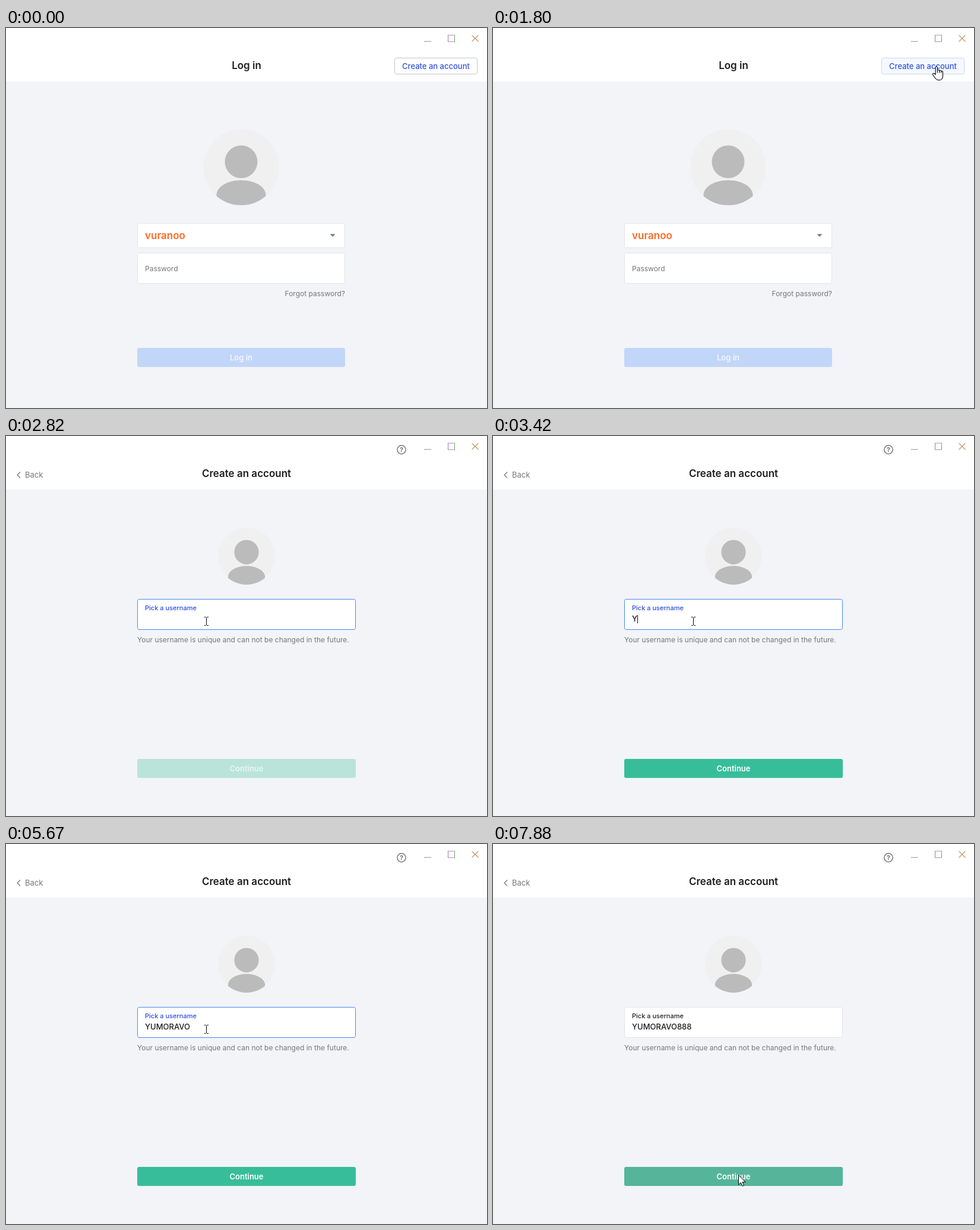
Animation, 810 px wide and 639 px high, one loop 8000 ms. Source, as an HTML page:

```html
<!DOCTYPE html>
<html lang="en">
<head>
<meta charset="utf-8">
<title>Account sign-up</title>
<style>
  html, body { margin: 0; width: 100%; height: 100%; overflow: hidden; background: #fff; }
  svg { display: block; width: 810px; height: 639px; }
  text { font: 400 12px Inter, "Open Sans", sans-serif; fill: #777; }
  .title { font-size: 17px; font-weight: 600; fill: #1c1d20; text-anchor: middle; }
  .button { font-size: 13px; font-weight: 600; fill: #fff; text-anchor: middle; }
  .field { fill: #fff; stroke: #e2e4e7; }
  .line { fill: none; stroke: #777; }
  .hide { display: none; }

  #create rect { fill: #fff; stroke: #c4c6ca; }
  #create text { font-size: 13px; font-weight: 500; fill: #3353dc; text-anchor: middle; }
  #create.hover rect { fill: #f5f9ff; stroke: #c3d8fb; }

  #label { font-size: 12px; }
  #signup.focus #label, #signup.filled #label { font-size: 11px; font-weight: 500; fill: #1f2024; }
  #signup.focus #label { fill: #2c4be0; }
  #signup.focus .field { stroke: #4a86f2; }
  #typed { font-size: 13px; font-weight: 500; fill: #1c1d20; }
  #go rect { fill: #bae4da; }
  #go text { fill: #e8f6f2; }
  #signup.filled #go rect { fill: #38bd9b; }
  #signup.filled #go text { fill: #fff; }
  #signup.over #go rect { fill: #55b59a; }
</style>
</head>
<body>
<svg viewBox="0 0 810 639">
  <defs>
    <clipPath id="disc"><circle r="64"/></clipPath>
    <g id="avatar" clip-path="url(#disc)">
      <circle r="64" fill="#f0f0f0"/>
      <g fill="#bbb">
        <circle cy="-9" r="27.5"/>
        <path d="M-41.5 66V47C-41.5 33-23 22 0 22S41.5 33 41.5 47V66Z"/>
      </g>
    </g>
  </defs>
  <rect width="810" height="639" fill="#fff"/>

  <g id="login">
    <rect y="90" width="810" height="549" fill="#f2f4f8"/>
    <text class="title" x="405" y="69">Log in</text>
    <g id="create">
      <rect x="654.5" y="50.5" width="139" height="27" rx="3"/>
      <text x="724" y="69">Create an account</text>
    </g>
    <use href="#avatar" x="396" y="234"/>
    <rect class="field" x="221.5" y="328.5" width="349" height="41" rx="3"/>
    <text x="234" y="355" style="font-size:17px;font-weight:600;fill:#ff6a21">vuranoo</text>
    <path d="M546.5 347h7l-3.5 3.6z" fill="#6d7985" stroke="#6d7985" stroke-linejoin="round"/>
    <rect class="field" x="221.5" y="378.5" width="349" height="51" rx="3"/>
    <text x="234" y="409">Password</text>
    <text x="571" y="451" text-anchor="end">Forgot password?</text>
    <rect x="221" y="538" width="350" height="32" rx="3" fill="#c2d6f9"/>
    <text class="button" x="396" y="559" style="fill:#f3f6fc">Log in</text>
  </g>

  <g id="loading">
    <path class="line" d="M27 13.5L20 20l7 6.5" stroke-width="1.5"/>
    <path id="spin" fill="none" stroke="#5b8def" stroke-width="1.4"/>
  </g>

  <g id="signup">
    <rect y="90" width="810" height="549" fill="#f2f4f8"/>
    <path class="line" d="M24 60.5L19 65.5l5 5" stroke-width="1.2"/>
    <text x="32" y="70" style="font-size:13px">Back</text>
    <text class="title" x="405" y="69">Create an account</text>
    <circle class="line" cx="666" cy="23" r="7.2" stroke-width="1.5"/>
    <text x="666" y="27" text-anchor="middle" style="font-size:11px;font-weight:700">?</text>
    <use href="#avatar" transform="translate(405 202) scale(.75)"/>
    <rect class="field" x="221.5" y="274.5" width="367" height="51" rx="3"/>
    <text id="label" x="234" y="293">Pick a username</text>
    <text id="typed" x="234" y="312"></text>
    <rect id="caret" y="301" width="1" height="14" fill="#111"/>
    <text x="221" y="347">Your username is unique and can not be changed in the future.</text>
    <g id="go">
      <rect x="221" y="543" width="368" height="32" rx="3"/>
      <text class="button" x="405" y="564">Continue</text>
    </g>
  </g>

  <g fill="none">
    <path d="M704 22.5h12" stroke="#999"/>
    <path d="M744 12h12M744 23h12" stroke="#999"/>
    <path d="M744.5 12v11" stroke="#b767c4"/>
    <path d="M755.5 12v11" stroke="#6ba573"/>
    <path d="M784.5 12l11 11M795.5 12l-11 11" stroke="#c6976b" stroke-width="1.1"/>
  </g>

  <g id="pointer" stroke="#000" fill="#fff">
    <path id="arrow" d="M.5.5V17l3.9-3.7 2.6 6 2.5-1.1L7 12.4h5.2Z"/>
    <g id="hand" stroke-width="1.1">
      <path d="M-.8 13V1.4a1.6 1.6 0 0 1 3.2 0V6.5C3 5 5.6 5 5.8 7 6.5 5.8 8.6 6 8.8 7.8 10 7 11.5 7.5 11.5 9V16c0 4-2.5 6.5-5 6.5H3.5c-3.5 0-5.5-4.5-9-9-1-2 1.5-3.4 4.7-.5Z"/>
      <path d="M2.4 6.5v4M5.8 7v3.5M8.8 7.8v3" fill="none"/>
    </g>
    <path id="beam" d="M-3 -6.5h2.5M1.5 -6.5h2.5M.5 -6v13M-3 7.5h2.5M1.5 7.5h2.5" fill="none"/>
  </g>
</svg>

<script>
const LOOP = 8000, NAME = 'YUMORAVO888';
const el = id => document.getElementById(id);
const show = (id, on) => el(id).classList.toggle('hide', !on);
const last = (list, t) => list.filter(row => row[0] <= t).pop();

const moves = [
  [0, 'none', 0, 0],
  [600, 'arrow', 787, 619], [800, 'arrow', 775, 462], [1000, 'arrow', 763, 305],
  [1200, 'arrow', 754, 180], [1400, 'arrow', 748, 98], [1600, 'hand', 746, 65],
  [2410, 'arrow', 560, 175], [2615, 'beam', 360, 305], [2820, 'beam', 337, 311],
  [7070, 'beam', 343, 318], [7270, 'arrow', 366, 390], [7475, 'arrow', 394, 490],
  [7680, 'arrow', 413, 558], [7880, 'arrow', 413, 556]
];

// [time, letters, caret visible]
const typing = [[0, 0, 0], [3420, 1, 1], [3640, 2, 1]];
for (let i = 0; i < 6; i++) typing.push([4040 + i * 204, 3 + i, 1]);
typing.push([5670, 8, 0], [6070, 8, 1], [6270, 9, 1], [6465, 10, 1], [6660, 11, 1], [7070, 11, 0]);

function arc(from, sweep) {
  const at = deg => {
    const a = deg * Math.PI / 180;
    return `${396 + 14 * Math.cos(a)} ${364 + 14 * Math.sin(a)}`;
  };
  return `M${at(from)}A14 14 0 0 1 ${at(from + sweep)}`;
}

function draw(t) {
  show('login', t < 2000);
  show('loading', t >= 2000 && t < 2410);
  show('signup', t >= 2410);
  el('create').classList.toggle('hover', t >= 1600);
  el('spin').setAttribute('d', t < 2205 ? arc(-36, 20) : arc(10, 110));

  const [, count, caret] = last(typing, t);
  const focus = t >= 2820 && t < 7880, form = el('signup').classList;
  form.toggle('focus', focus);
  form.toggle('filled', count > 0);
  form.toggle('over', t >= 7680);
  el('label').setAttribute('y', focus || count ? 293 : 304);
  const typed = el('typed');
  typed.textContent = NAME.slice(0, count);
  show('caret', caret);
  if (caret) el('caret').setAttribute('x', Math.round(234 + typed.getComputedTextLength()));

  const [, kind, x, y] = last(moves, t);
  for (const id of ['arrow', 'hand', 'beam']) show(id, id === kind);
  el('pointer').setAttribute('transform', `translate(${x} ${y})`);
}

const start = performance.now();
function tick() {
  draw((performance.now() - start) % LOOP);
  requestAnimationFrame(tick);
}
tick();
</script>
</body>
</html>
```
